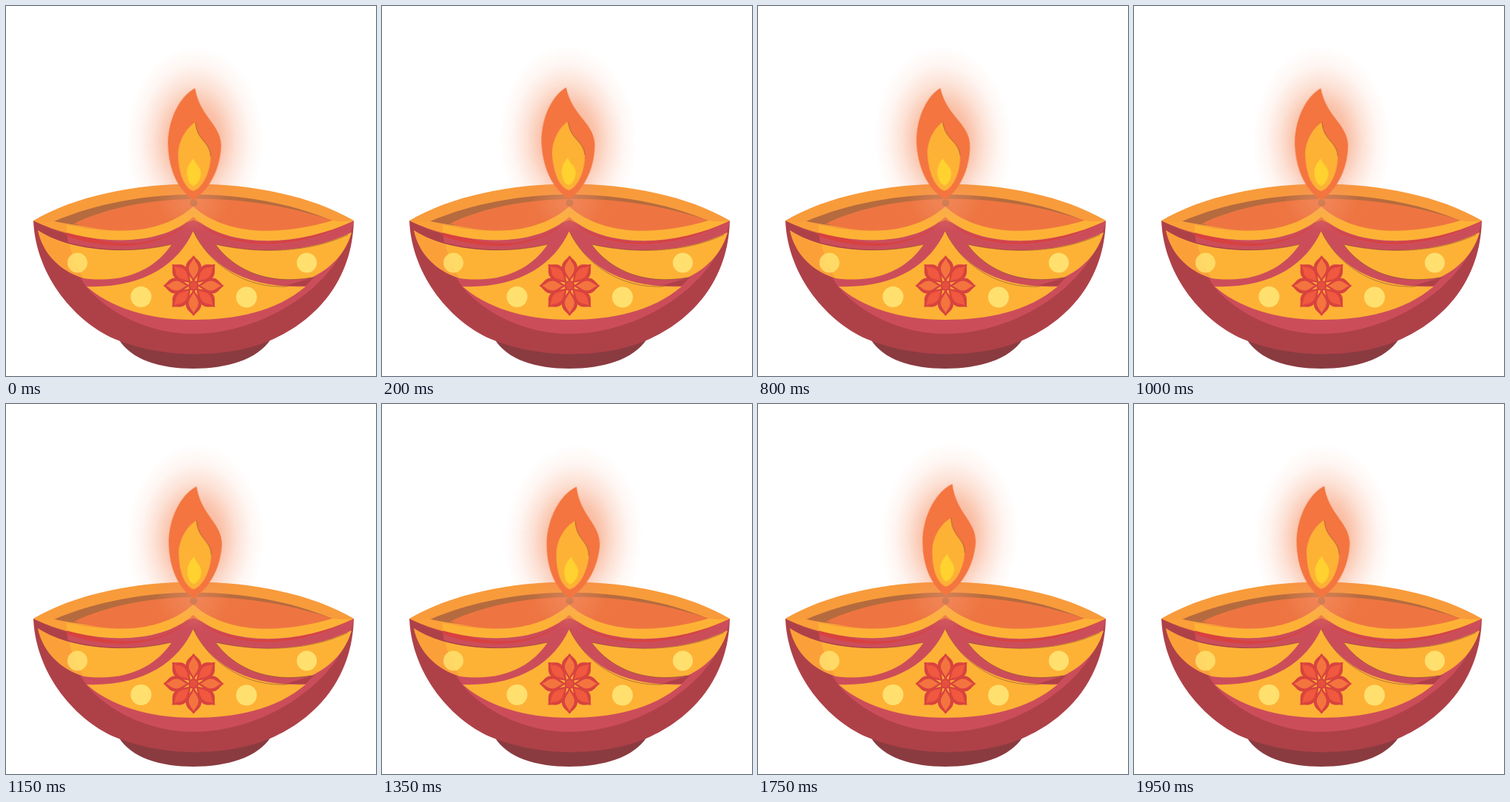
Write an HTML page without scripts that moves like this. It is 500x500 px and loops after 2 s.

```html
<!DOCTYPE html>
<html lang="en">
<head>
<meta charset="utf-8">
<title>Oil lamp</title>
<style>
  html, body { margin: 0; width: 100%; height: 100%; overflow: hidden; background: #fff; }
  svg { display: block; width: 100vw; height: 100vh; }

  .dark { fill: #ae4148; }
  .face { fill: #cc4d5a; }
  .gold { fill: #fdb236; }
  .dot { fill: #ffe06f; }
  .shade { fill: #f5803f; opacity: .36; }
  .line { fill: none; stroke: #6b3a2c; stroke-width: .9; opacity: .55; }

  .bob { animation: bob 2s infinite; }
  .sway {
    transform-origin: 253px 262px;
    animation: sway 1s cubic-bezier(.37, 0, .63, 1) -.455s infinite alternate;
  }
  @keyframes sway {
    from { transform: rotate(4.1deg); }
    to { transform: rotate(-4.1deg); }
  }
  @keyframes bob {
    0%, 100% { transform: translateY(0); animation-timing-function: ease-in-out; }
    25% { transform: translateY(-3px); animation-timing-function: ease-in-out; }
    40% { transform: translateY(-.3px); animation-timing-function: linear; }
    50% { transform: translateY(.2px); animation-timing-function: linear; }
    67.5% { transform: translateY(.5px); animation-timing-function: ease-in-out; }
    86% { transform: translateY(-3.4px); animation-timing-function: ease-in-out; }
  }
</style>
</head>
<body>
<svg viewBox="0 0 500 500">
  <defs>
    <radialGradient id="halo">
      <stop offset="0" stop-color="#f47a45" stop-opacity=".6"/>
      <stop offset=".38" stop-color="#f47a45" stop-opacity=".46"/>
      <stop offset=".6" stop-color="#f47a45" stop-opacity=".22"/>
      <stop offset=".8" stop-color="#f47a45" stop-opacity=".07"/>
      <stop offset="1" stop-color="#f47a45" stop-opacity="0"/>
    </radialGradient>
    <radialGradient id="shine">
      <stop offset="0" stop-color="#f8b99c" stop-opacity=".3"/>
      <stop offset="1" stop-color="#f8b99c" stop-opacity="0"/>
    </radialGradient>
    <path id="left" d="M43 303C85 331 160 337 224 322C204 352 166 376 105 368C70 357 49 332 43 303Z"/>
    <clipPath id="leftClip"><use href="#left"/></clipPath>
    <g id="petal">
      <path fill="#d8433e" d="M0-41C4-35 10.500-33 10.500-25C10-16 3-12 0-4C-3-12-10-16-10.500-25C-10.500-33-4-35 0-41Z"/>
      <path d="M0-37C3-31 6.500-29 6.500-23C6-17 2-14 0-9C-2-14-6-17-6.500-23C-6.500-29-3-31 0-37Z"/>
    </g>
    <g id="cross">
      <use href="#petal"/>
      <use href="#petal" transform="rotate(90)"/>
      <use href="#petal" transform="rotate(180)"/>
      <use href="#petal" transform="rotate(270)"/>
    </g>
  </defs>

  <!-- foot and body -->
  <path fill="#8a3b40" d="M152 450C169 478 208 490 253 490C298 490 340 478 358 450Z"/>
  <path class="dark" d="M37 290C40 365 95 430 152 452C215 477 300 476 357 452C420 425 468 370 470 290Z"/>
  <path class="face" d="M82 292L470 290C455 375 350 443 253 443C197 443 141 418 108 379L100 366Q82 340 82 292Z"/>

  <!-- oil and rim -->
  <path fill="#f89b3b" d="M37 290C149 224 358 224 470 290C405 322 325 325 253 284C182 325 102 322 37 290Z"/>
  <path fill="#b56b3e" d="M65 291C180 243 326 243 441 290Q350 310 253 290Q160 310 65 291Z"/>
  <path fill="#ee7541" d="M92 294C175 253 320 248 441 290Q350 320 253 290Q160 315 92 294Z"/>
  <circle cx="253.5" cy="266" r="5" fill="#b8693f"/>

  <!-- golden swag with a red line below -->
  <path fill="#d8413f" d="M82 302C150 330 205 327 253 289C301 327 385 330 470 290C390 333 300 331 253 289C206 331 140 331 82 311Z"/>
  <path class="gold" d="M37 290Q50 293 65 291C141 312 210 309 253 271C296 309 365 312 441 290Q456 292 470 290C396 326 300 328 253 285C206 328 111 324 37 290Z"/>
  <path class="shade" d="M37 290Q50 293 65 291L82 295V308Q58 301 37 290Z"/>

  <!-- panels -->
  <use href="#left" class="gold"/>
  <path class="gold" d="M467 306C415 331 350 337 283 322C306 354 350 378 413 367C440 354 459 334 467 306Z"/>
  <path class="gold" d="M253 304C275 351 325 382 405 379C365 413 310 424 253 424C192 424 140 407 109 379C182 382 232 351 253 304Z"/>
  <path class="dark" d="M378 378Q398 372 417 366L405 378Z"/>
  <path class="line" d="M83 320C130 332 177 333 224 322M462 309C415 331 350 337 283 322C306 354 350 378 413 367M253 304C275 351 325 382 380 379"/>

  <path class="shade" clip-path="url(#leftClip)" d="M37 290H82Q83 335 107 372H37Z"/>
  <circle class="dot" cx="96.500" cy="347" r="13.500" opacity=".85"/>
  <circle class="dot" cx="406.500" cy="347" r="13.500"/>
  <circle class="dot" cx="182.500" cy="393" r="14"/>
  <circle class="dot" cx="325" cy="393.500" r="14"/>

  <g transform="translate(253.500 378)">
    <use href="#cross" fill="#f0583f" transform="rotate(45)"/>
    <use href="#cross" fill="#f4743f"/>
    <circle r="7" fill="#d8433e"/>
    <circle r="5" fill="#e5503e"/>
  </g>

  <ellipse cx="253" cy="262" rx="50" ry="42" fill="url(#shine)"/>

  <g class="bob">
    <g class="sway">
      <ellipse cx="254" cy="182" rx="93" ry="128" fill="url(#halo)"/>
      <path fill="#f4753f" d="M254 111C238 119 219 146 218 185C219 226 235 250 253 262C276 248 290 217 290 187C288 158 261 150 254 111Z"/>
      <path class="gold" d="M255 157C242 165 232 183 232 201C233 231 243 247 253 250C266 246 276 223 276 203C275 183 257 182 255 157Z"/>
      <path class="line" d="M276 203C275 183 257 182 255 157"/>
      <path fill="#ffd22f" d="M253 206C247 212 244 219 244 226C245 236 248 241 253 243C259 241 263 233 263 225C262 216 255 214 253 206Z"/>
    </g>
  </g>
</svg>
</body>
</html>
```
